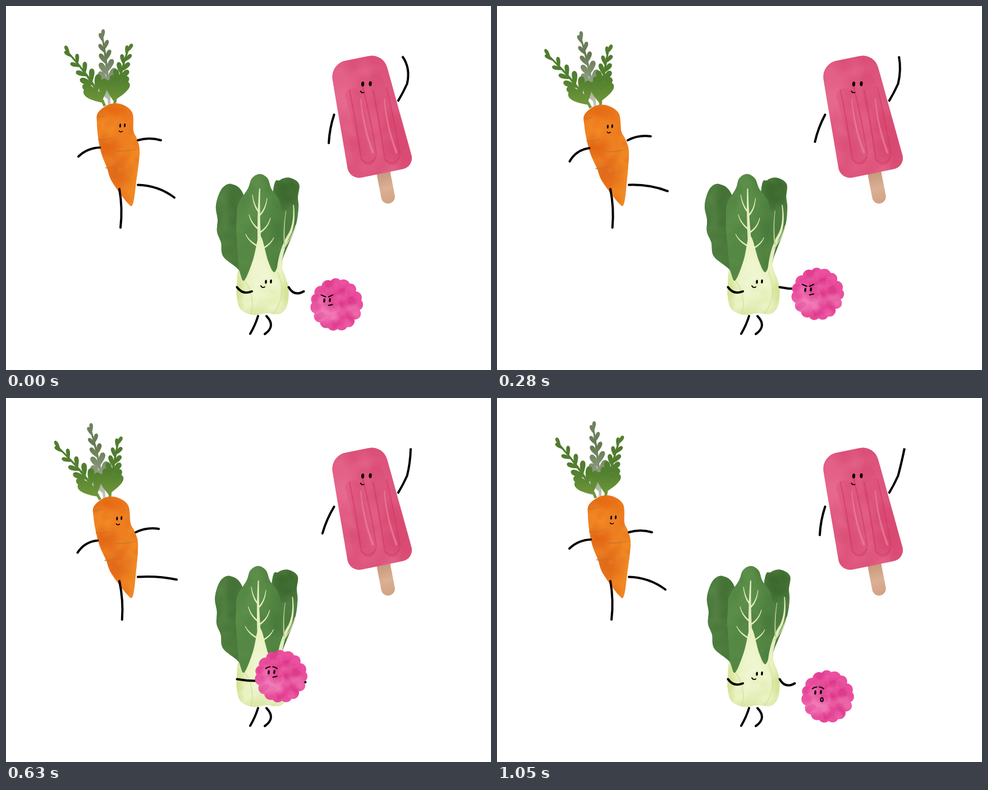
An HTML page with a canvas for the animation above (1.12 s loop, 864x648 px).

```html
<!DOCTYPE html>
<html lang="en">
<head>
<meta charset="utf-8">
<title>Dancing food</title>
<style>
html, body { margin: 0; width: 100%; height: 100%; overflow: hidden; background: #fff; }
canvas { display: block; }
</style>
</head>
<body>
<canvas id="stage" width="864" height="648"></canvas>
<script>
const ctx = document.getElementById('stage').getContext('2d');
const STEP = 70, STEPS = 16;
const still = (x, y) => [x, y];
let warp = still;

const clamp = v => Math.max(0, Math.min(1, v));
const mix = (a, b, k) => a + (b - a) * k;

// Rises from 0 at step a to 1 at step b, falls back to 0 from step c to d
const swell = (i, a, b, c, d) => clamp(Math.min((i - a) / (b - a), (d - i) / (d - c)));

// Value at step i from [step, value] keys, linear in between
function track(keys, i) {
  for (let n = 1; n < keys.length; n++) {
    const [a, va] = keys[n - 1], [b, vb] = keys[n];
    if (i <= b) return mix(va, vb, clamp((i - a) / (b - a)));
  }
  return keys[keys.length - 1][1];
}

function random(seed) {
  return () => (seed = (seed * 16807) % 2147483647) / 2147483647;
}

// Smooth closed outline through a few points
function outline(...points) {
  const pts = points.map(p => warp(...p)), n = pts.length, path = new Path2D();
  const at = i => pts[(i + n) % n];
  path.moveTo(...pts[0]);
  for (let i = 0; i < n; i++) {
    const a = at(i - 1), b = at(i), c = at(i + 1), d = at(i + 2);
    path.bezierCurveTo(b[0] + (c[0] - a[0]) / 6, b[1] + (c[1] - a[1]) / 6,
      c[0] - (d[0] - b[0]) / 6, c[1] - (d[1] - b[1]) / 6, c[0], c[1]);
  }
  return path;
}

function paint(path, color, inside) {
  ctx.fillStyle = color;
  ctx.fill(path);
  ctx.save();
  ctx.clip(path);
  inside();
  ctx.restore();
}

// Soft patch of pigment
function wash(x, y, rx, ry, color, alpha = 0.7, turn = 0) {
  ctx.save();
  ctx.translate(...warp(x, y));
  ctx.rotate(turn);
  ctx.scale(rx, ry);
  const g = ctx.createRadialGradient(0, 0, 0, 0, 0, 1);
  g.addColorStop(0, color);
  g.addColorStop(0.5, color + 'b0');
  g.addColorStop(1, color + '00');
  ctx.globalAlpha = alpha;
  ctx.fillStyle = g;
  ctx.fillRect(-1, -1, 2, 2);
  ctx.restore();
}

function mottle(seed, count, x, y, w, h, colors, size, alpha = 0.22) {
  const r = random(seed);
  for (let i = 0; i < count; i++) {
    wash(x + w * r(), y + h * r(), size * (0.5 + r()), size * (0.5 + r()),
      colors[i % colors.length], alpha, r() * 3);
  }
}

// Arc from one point to another, bowed sideways by sag
function limb(x0, y0, x1, y1, sag = 0, width = 4, color = '#000') {
  const len = Math.hypot(x1 - x0, y1 - y0);
  const cx = (x0 + x1) / 2 + (y1 - y0) / len * sag;
  const cy = (y0 + y1) / 2 - (x1 - x0) / len * sag;
  ctx.strokeStyle = color;
  ctx.lineWidth = width;
  ctx.lineCap = 'round';
  ctx.beginPath();
  ctx.moveTo(...warp(x0, y0));
  ctx.quadraticCurveTo(...warp(cx, cy), ...warp(x1, y1));
  ctx.stroke();
}

const curve = (a, b, c, t) => mix(mix(a, b, t), mix(b, c, t), t);

// Curved stroke that thins towards its end
function taper(x0, y0, cx, cy, x1, y1, w0, w1, color) {
  const left = [], right = [];
  for (let n = 0; n <= 12; n++) {
    const t = n / 12, x = curve(x0, cx, x1, t), y = curve(y0, cy, y1, t);
    const dx = mix(cx - x0, x1 - cx, t), dy = mix(cy - y0, y1 - cy, t);
    const k = mix(w0, w1, t) / 2 / Math.hypot(dx, dy);
    left.push(warp(x - dy * k, y + dx * k));
    right.unshift(warp(x + dy * k, y - dx * k));
  }
  ctx.fillStyle = color;
  ctx.beginPath();
  left.concat(right).forEach(p => ctx.lineTo(...p));
  ctx.fill();
}

function dot(x, y, rx, ry, color = '#000', turn = 0.08) {
  ctx.fillStyle = color;
  ctx.beginPath();
  ctx.ellipse(...warp(x, y), rx, ry, turn, 0, 7);
  ctx.fill();
}

function eyes(x, y, gap, rx, ry) {
  dot(x, y, rx, ry);
  dot(x + gap, y - 0.7, rx, ry);
}

function leaflet(x, y, angle, len) {
  const c = Math.cos(angle), s = Math.sin(angle), w = len * 0.36;
  const at = (u, v) => warp(x + c * len * u - s * w * v, y + s * len * u + c * w * v);
  ctx.beginPath();
  ctx.moveTo(...at(-0.05, 0.15));
  ctx.bezierCurveTo(...at(0.35, 0.5), ...at(0.95, 1), ...at(1, 0.05));
  ctx.bezierCurveTo(...at(0.95, -0.9), ...at(0.35, -0.5), ...at(-0.05, -0.15));
  ctx.fill();
}

// Stem with pairs of leaflets that shrink towards the tip
function frond(x0, y0, cx, cy, x1, y1, spread, colors) {
  const g = ctx.createLinearGradient(0, 40, 0, 178);
  colors.forEach((c, n) => g.addColorStop(n / (colors.length - 1), c));
  taper(x0, y0, cx, cy, x1, y1, 5, 3, g);
  ctx.fillStyle = g;
  for (let n = 0; n < 6; n++) {
    for (const side of [-1, 1]) {
      const t = 0.12 + 0.162 * n + 0.025 * side;
      const angle = Math.atan2(mix(cy - y0, y1 - cy, t), mix(cx - x0, x1 - cx, t));
      const lean = n === 5 ? 0.25 : spread;
      leaflet(curve(x0, cx, x1, t), curve(y0, cy, y1, t), angle + side * lean, 16 + 28 * (1 - t) ** 2);
    }
  }
}

function carrot(i) {
  const bend = Math.min(6 * i, 3.7 * (15 - i));
  warp = (x, y) => {
    const h = Math.max(0, 350 - y);
    return [x - bend * (h / 312) ** 1.65, y + bend / 600 * (262 - x) * Math.min(1, h / 177)];
  };
  frond(184, 178, 182, 110, 171, 52, 0.5, ['#728565', '#64794f', '#8d9c80', '#c3cbbd']);
  frond(176, 178, 158, 135, 108, 80, 0.62, ['#648a2d', '#4f7a2f', '#52802f', '#73993b']);
  frond(193, 178, 200, 130, 218, 76, 0.5, ['#648a2d', '#4f7a2f', '#52802f', '#73993b']);

  const body = outline([164, 190], [184, 175], [206, 175], [225, 190], [227, 222], [233, 236], [238, 260],
    [232, 312], [226, 352], [217, 351], [189, 313], [180, 288], [171, 266], [165, 240], [162, 208]);
  paint(body, '#ee7f20', () => {
    wash(190, 185, 42, 18, '#e2630f');
    wash(178, 215, 24, 28, '#f58b24');
    wash(180, 250, 30, 24, '#dd5c10');
    wash(196, 295, 28, 34, '#db5f17');
    wash(226, 300, 22, 70, '#f08d22');
    mottle(17, 60, 160, 175, 78, 175, ['#f8962e', '#e4680f', '#d95e1a'], 12);
  });
  for (const [x, y, len] of [[164, 238, 26], [177, 288, 23], [164, 197, 14], [197, 258, 35]]) {
    taper(x, y, x + len / 2, y + 1, x + len, y - 3, 2.5, 1, '#bb7628b0');
  }
  eyes(203.5, 213, 8, 1.5, 3.4);
  limb(201.5, 222.5, 207.5, 223, -3, 1.6);

  warp = still;
  const swing = swell(i, 0, 6, 6.6, 12.2);
  const lean = swell(i, 0, 8, 8, 15), slide = 4.5 * lean, kick = lean ** 0.8;
  limb(167 - slide, 252 + 2 * lean, 129 - slide + 4 * swing, 268 + 13 * swing, -8 - 4 * swing);
  limb(235 - slide, 239, 276 - slide, 239 - 10.5 * swing, 6 + swing);
  limb(202, 326, 204 + 3.2 * lean, 394.5, 5);
  limb(235, 318.5, 300 + 4 * swell(i, 0, 3, 11, 15), 341 - 20 * kick, 11 - 7 * kick);
}

function popsicle(i) {
  const wood = ctx.createLinearGradient(668, 300, 682, 350);
  wood.addColorStop(0, '#c99a7e');
  wood.addColorStop(0.5, '#dbb094');
  wood.addColorStop(1, '#d3a284');
  limb(671, 290, 680.5, 339.5, 0, 24.5, wood);

  const corners = [[577, 103, 29], [672, 84, 28], [728, 286, 20], [612, 310, 21]];
  const body = new Path2D();
  body.moveTo(594, 204);
  corners.forEach(([x, y, r], n) => {
    const next = corners[(n + 1) % 4];
    body.arcTo(x, y, next[0], next[1], r);
  });
  body.closePath();
  paint(body, '#de557d', () => {
    wash(602, 160, 34, 90, '#e8688f', 0.8, -0.15);
    wash(640, 94, 70, 20, '#d84c75', 0.5, -0.2);
    wash(702, 240, 30, 80, '#d7456d', 0.8, -0.25);
    mottle(29, 80, 578, 85, 148, 225, ['#ea7598', '#d5456e', '#e25f86'], 20, 0.2);
    for (const x of [640, 682]) {
      limb(x - 22, x === 640 ? 160 : 135, x + 6, 270, 2, 27, '#d23c6838');
      limb(x - 28, 150, x - 8, 268, 2, 2.5, '#cd386490');
      limb(x - 8, 272, x + 19, 268, -20, 3, '#cd386470');
      limb(x - 4, 145, x + 20, 264, 2, 2.5, '#cd386490');
      taper(x - 8, 165, x - 4, 215, x + 14, 262, 2, 4, '#ee86a4a0');
    }
  });
  eyes(635.5, 139, 13.5, 2.6, 4.4);
  limb(631.5, 151.5, 637.5, 154, -3, 1.8);

  const tip = track([[0, 706], [8, 726], [12, 706], [15, 726]], i);
  ctx.strokeStyle = '#000';
  ctx.lineWidth = 4;
  ctx.lineCap = 'butt';
  ctx.beginPath();
  ctx.moveTo(698, 170);
  ctx.quadraticCurveTo(707, 155, 714.5, 138.5);
  ctx.quadraticCurveTo(720 + (726 - tip) / 20, 118 - (726 - tip) / 2.5, tip, 89.5);
  ctx.stroke();
  const drift = swell(i, 0, 7, 7, 15);
  limb(584.5, 193.5, 575 - 15 * drift, 244 - 4 * drift, -3.5);
}

function bokChoy(i) {
  const bend = Math.max(0, Math.min(1.75 * i, 2.5 * (10.2 - i)));
  warp = (x, y) => [x - bend * (Math.max(0, 480 - y) / 181) ** 1.5, y];
  const cream = '#e4eec0', greens = ['#3c6a31', '#5b8b4a', '#4a793a'];

  const left = outline([424, 490], [414, 469], [387, 446], [383, 421], [376, 402], [377, 380], [374, 355],
    [384, 326], [402, 317], [424, 338], [440, 420]);
  paint(left, '#4b7a3c', () => {
    wash(384, 370, 20, 70, '#568546');
    wash(410, 360, 20, 70, '#3e6b32');
    mottle(41, 50, 374, 318, 60, 165, greens, 15);
  });
  const right = outline([476, 328], [488, 310], [506, 306], [522, 317], [520, 340], [521, 360], [515, 395],
    [493, 450], [489, 474], [462, 470]);
  paint(right, '#4d7d3f', () => {
    wash(500, 328, 30, 38, '#345f27', 0.9);
    mottle(67, 40, 470, 306, 52, 165, greens, 14);
  });
  const middle = outline([424, 489], [411, 415], [411, 378], [414, 352], [431, 325], [438, 307], [452, 299],
    [466, 307], [473, 326], [488, 350], [492, 395], [482, 470]);
  paint(middle, '#568845', () => {
    wash(440, 340, 26, 60, '#62954f');
    wash(484, 400, 18, 80, '#437438');
    mottle(83, 60, 410, 300, 82, 185, ['#649850', '#47783a', '#528541'], 16);
  });

  taper(452, 432, 449, 380, 452, 325, 7, 2, cream);
  for (let n = 0; n < 3; n++) {
    for (const side of [-1, 1]) {
      const y = 432 - 31 * n + 3 * side, out = 452 + side * (25 - 6 * n);
      taper(451, y, mix(452, out, 0.8), y - 10, out, y - 23 - 4 * n, 3, 1, cream);
    }
  }
  taper(486, 474, 489, 432, 506, 405, 8, 4.5, cream);
  taper(506, 405, 515, 385, 512, 354, 4.5, 1.5, cream);
  taper(496, 425, 494, 392, 499, 364, 2.5, 1, '#b5ce8e');
  taper(494, 432, 508, 415, 516, 390, 2.5, 1, '#c9dca2');

  const bulb = outline([411, 518], [411, 496], [414, 470], [424, 489], [440, 452], [449, 414], [456, 414],
    [467, 454], [478, 474], [489, 453], [493, 469], [503, 500], [501, 532], [488, 548], [464, 547],
    [440, 550], [418, 540]);
  paint(bulb, '#e9f2c0', () => {
    for (const side of [-1, 1]) wash(457 + 44 * side, 510, 14, 54, '#d0e08f', 0.9);
    wash(455, 550, 50, 16, '#d3e29c');
    wash(453, 480, 22, 60, '#f4f9dc');
    mottle(7, 40, 410, 470, 92, 78, ['#f5fae0', '#dae8a6'], 13);
    limb(420, 482, 436, 549, 18, 1.5, '#c3d78890');
    limb(484, 474, 476, 549, 22, 1.5, '#c3d78890');
  });
  warp = still;
  eyes(463, 491, 9, 1.8, 3.6);
  limb(454, 498, 461, 500, -4, 1.9);
  limb(449, 552, 435, 583.5, 2);
  limb(464, 552, 461, 584, 19);

  const hug = swell(i, 6, 9, 11, 15), reach = swell(i, 0, 3, 7, 11);
  limb(411.5, 500.5, 438 + 6.5 * hug, 508 - 4.5 * hug, mix(-11, -1.5, hug));
  limb(503.5, 500.5, 530.5 + 6 * reach, 508 - 4.5 * reach, mix(-14, -2, reach));
}

function berry(i) {
  const x = track([[3, 589], [5, 553.5], [7, 516], [8, 498], [9, 490], [13, 589]], i);
  const hop = 488.5 - 1.125 * (i - 7) + 2.31 * (i - 7) ** 2;
  const y = i < 9 ? Math.min(531.5, hop) : track([[9, 495.5], [13, 531.5]], i);
  const squash = i <= 3 ? 0.065 * i / 3 : 0;
  ctx.save();
  ctx.translate(x, y + 24 * squash);

  ctx.save();
  ctx.scale(1, 1 - squash);
  const ball = new Path2D(), r = random(11), bumps = 15;
  ball.arc(0, 0, 38, 0, 7);
  for (let n = 0; n < bumps; n++) {
    const a = (n + 0.3 * r()) * Math.PI * 2 / bumps, size = 10 + 2 * r();
    const bx = Math.cos(a) * (47 - size), by = Math.sin(a) * (47 - size);
    ball.moveTo(bx + size, by);
    ball.arc(bx, by, size, 0, 7);
  }
  paint(ball, '#ea4f9f', () => {
    wash(4, -14, 40, 24, '#dc2f84', 0.9);
    wash(24, 8, 22, 24, '#de5597');
    wash(-18, 14, 30, 26, '#f085bd', 0.9);
    wash(-14, 38, 18, 12, '#dc3385');
    for (let n = 0; n < 30; n++) {
      const a = n * 2.4, d = 7.6 * Math.sqrt(n);
      dot(Math.cos(a) * d, Math.sin(a) * d, 6 + 4 * r(), 5 + 4 * r(),
        ['#f77ab838', '#d0227838', '#ee55a440'][n % 3], a);
    }
    mottle(53, 26, -40, -40, 80, 80, ['#f58cc0', '#d62a7e'], 11, 0.28);
  });
  ctx.restore();

  eyes(-22, -7.2, 10, 1.8, 3.7);
  const angry = i < 9, tilt = angry ? 3.5 : -3.2;
  limb(-27.5, -15.4 - tilt / 2, -19.5, -15.4 + tilt / 2, angry ? 0 : 1.5, 2);
  limb(-14.5, -15.4 + tilt / 2, -7, -15.4 - tilt / 2, angry ? 0 : 1.5, 2);
  if (i < 10) {
    limb(-14.5, 1.5, -7.5, 0, 0, 2);
  } else {
    ctx.lineWidth = 1.9;
    ctx.strokeStyle = '#000';
    ctx.beginPath();
    ctx.ellipse(-10.3, 5.5, 2.3, 3.3, 0, 0, 7);
    ctx.stroke();
  }
  ctx.restore();
}

let shown = -1;
const start = performance.now();
function draw() {
  const i = Math.floor((performance.now() - start) / STEP) % STEPS;
  if (i !== shown) {
    shown = i;
    ctx.fillStyle = '#fff';
    ctx.fillRect(0, 0, 864, 648);
    [carrot, popsicle, bokChoy, berry].forEach(part => part(i));
  }
  requestAnimationFrame(draw);
}
draw();
</script>
</body>
</html>
```
